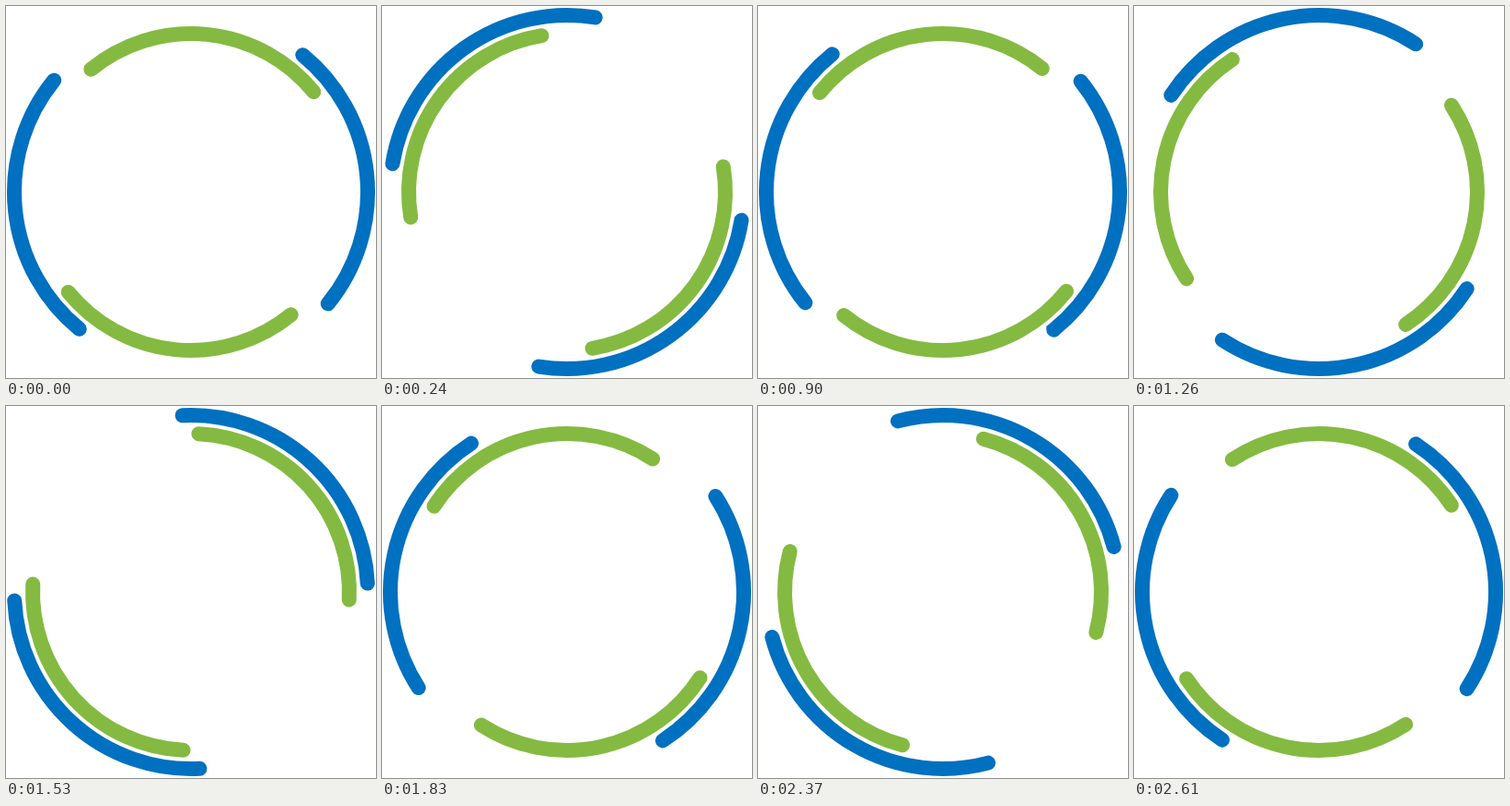
Animation, 402 px wide and 404 px high, one loop 2630 ms. Source, as an HTML page with a canvas:

```html
<!DOCTYPE html>
<html lang="en">
<head>
<meta charset="utf-8">
<title>Counter-rotating rings</title>
<style>
  html, body { margin: 0; width: 100%; height: 100%; overflow: hidden; background: #fff; }
  canvas { display: block; }
</style>
</head>
<body>
<canvas id="stage" width="402" height="404"></canvas>
<script>
const ctx = document.getElementById('stage').getContext('2d');
const LOOP = 2630, STEP = 30;
const CENTER = { x: 201, y: 202 };
const rad = deg => deg * Math.PI / 180;

// Two opposite quarter arcs centred on the given angle
function arcPair(radius, color, angle) {
  ctx.strokeStyle = color;
  for (const mid of [angle, angle + 180]) {
    ctx.beginPath();
    ctx.arc(CENTER.x, CENTER.y, radius, rad(mid - 45), rad(mid + 45));
    ctx.stroke();
  }
}

function draw(time) {
  const step = Math.floor((time % LOOP) / STEP);
  // The loop opens with a short skip, then turns evenly
  const turn = 51.2 + 6 * (step === 0 ? -2 : step);
  ctx.fillStyle = '#fff';
  ctx.fillRect(0, 0, 402, 404);
  ctx.lineWidth = 16;
  ctx.lineCap = 'round';
  arcPair(192, '#0070c0', -45 + turn);
  arcPair(172, '#84ba41', -45 - turn);
}

const start = performance.now();
function tick() {
  draw(performance.now() - start);
  requestAnimationFrame(tick);
}
tick();
</script>
</body>
</html>
```
